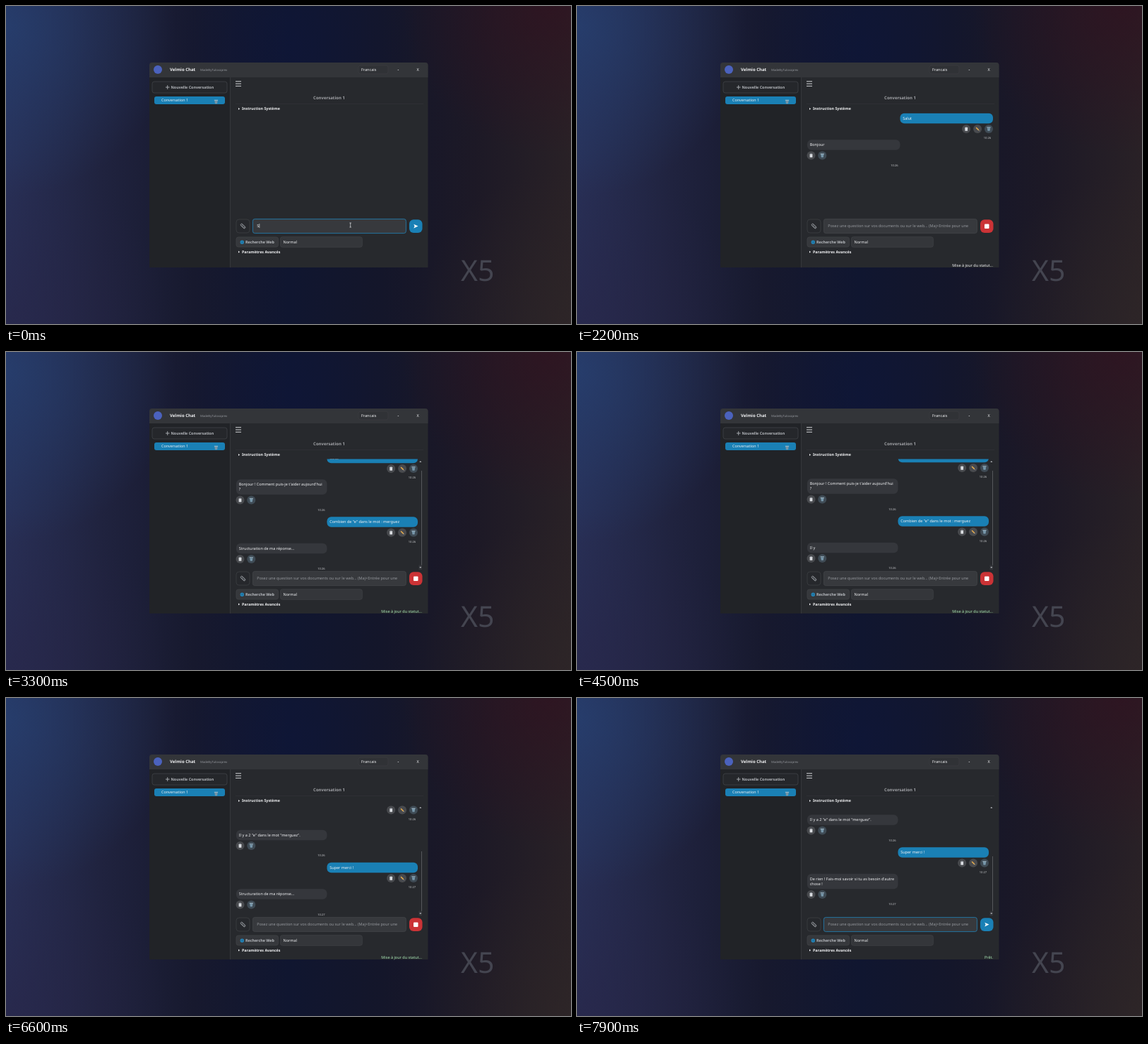
Animation of 800x450 px, one loop 8000 ms. Source, as an HTML page with a canvas:

```html
<!DOCTYPE html>
<html lang="fr">
<head>
<meta charset="utf-8">
<title>Chat</title>
<style>
html, body { margin: 0; width: 100%; height: 100%; overflow: hidden; background: #17192c; }
canvas { display: block; width: 800px; height: 450px; }
</style>
</head>
<body>
<canvas id="stage"></canvas>
<script>
const LOOP = 8000, STEP = 100;
const BLUE = '#1a80b5', WHITE = '#f0f1f3', GREEN = '#a8e5b4';
const canvas = document.getElementById('stage');
const ctx = canvas.getContext('2d');
const dpr = window.devicePixelRatio || 1;
canvas.width = 800 * dpr;
canvas.height = 450 * dpr;
ctx.scale(dpr, dpr);
ctx.textRendering = 'geometricPrecision';

// typeAt/typeRate and replyAt/replyRate: start in ms, characters per ms
const rounds = [
  { ask: 'Salut', typeAt: -100, typeRate: .01, sent: 600,
    reply: ["Bonjour ! Comment puis-je t'aider aujourd'hui", '?'],
    replyAt: 2150, replyRate: .14, done: 2500, clock: '10:26' },
  { ask: 'Combien de "e" dans le mot : merguez', typeAt: 2550, typeRate: .08, sent: 3100,
    reply: ['Il y a 2 "e" dans le mot "merguez".'],
    replyAt: 4467, replyRate: .12, done: 4800, clock: '10:26' },
  { ask: 'Super merci !', typeAt: 5150, typeRate: .02, sent: 6000,
    reply: ["De rien ! Fais-moi savoir si tu as besoin d'autre", 'chose !'],
    replyAt: 7267, replyRate: .12, done: 7800, clock: '10:27' }
];

// from ms, y of the first message, top of the scrollbar thumb
const scrollSteps = [
  [0, 159, 0], [3100, 150, 168], [4200, 149, 168], [4800, 142.5, 173],
  [6000, 66, 217], [7700, 58.5, 220], [7800, 44.5, 224]
];

function text(str, x, y, { size = 5.5, bold = false, color = WHITE, align = 'left' } = {}) {
  ctx.font = `${bold ? 'bold ' : ''}${size}px "Noto Sans", "Open Sans", sans-serif`;
  ctx.fillStyle = color;
  ctx.textAlign = align;
  ctx.textBaseline = 'alphabetic';
  ctx.fillText(str, x, y + size * .35);
}

function box(x, y, w, h, r, fill, stroke) {
  ctx.beginPath();
  ctx.roundRect(x, y, w, h, r);
  if (fill) { ctx.fillStyle = fill; ctx.fill(); }
  if (stroke) { ctx.strokeStyle = stroke; ctx.lineWidth = .8; ctx.stroke(); }
}

function disc(x, y, r, fill) {
  ctx.beginPath();
  ctx.arc(x, y, r, 0, 7);
  ctx.fillStyle = fill;
  ctx.fill();
}

function poly(points, fill) {
  ctx.beginPath();
  points.forEach(([x, y]) => ctx.lineTo(x, y));
  ctx.closePath();
  ctx.fillStyle = fill;
  ctx.fill();
}

function line(x1, y1, x2, y2, color, width = .8) {
  ctx.beginPath();
  ctx.moveTo(x1, y1);
  ctx.lineTo(x2, y2);
  ctx.strokeStyle = color;
  ctx.lineWidth = width;
  ctx.stroke();
}

function glow(x, y, r, rgb, alpha) {
  const g = ctx.createRadialGradient(x, y, 0, x, y, r);
  g.addColorStop(0, `rgba(${rgb},${alpha})`);
  g.addColorStop(1, `rgba(${rgb},0)`);
  ctx.fillStyle = g;
  ctx.fillRect(0, 0, 800, 450);
}

function background() {
  const g = ctx.createLinearGradient(0, 0, 800, 0);
  ['#283057', '#20233f', '#17192e', '#101630', '#14162a', '#1d1926', '#292126']
    .forEach((c, i) => g.addColorStop(i / 6, c));
  ctx.fillStyle = g;
  ctx.fillRect(0, 0, 800, 450);
  glow(0, 30, 240, '38,66,116', .7);
  glow(0, 450, 230, '40,36,70', .6);
  glow(770, 0, 210, '48,18,32', .75);
  glow(800, 450, 220, '48,40,40', .6);
  glow(400, 60, 190, '14,22,58', .6);
  text('X5', 644, 374.5, { size: 41, color: '#444550' });
}

const icons = {
  copy(x, y) {
    box(x - 1.9, y - 2.3, 3.8, 5, .5, '#d9dce0');
    box(x - 1, y - 2.9, 2, 1.2, .4, '#8d9299');
  },
  edit(x, y) {
    line(x - 2, y - 2, x + 1.6, y + 1.6, '#e5ac4d', 1.5);
    line(x + 1.6, y + 1.6, x + 2.5, y + 2.5, '#d8d0c0', .9);
  },
  trash(x, y) {
    line(x - 2.6, y - 2.2, x + 2.6, y - 2.2, '#a9c3d3', 1);
    poly([[x - 2.2, y - 1.4], [x + 2.2, y - 1.4], [x + 1.5, y + 2.8], [x - 1.5, y + 2.8]], '#7695a8');
  }
};

function iconButton(kind, x, y) {
  disc(x, y, 6, kind === 'trash' ? '#3f4b55' : '#484a4e');
  icons[kind](x, y);
}

function disclosure(label, y) {
  poly([[329, y - 1.5], [331, y], [329, y + 1.5]], WHITE);
  text(label, 334, y, { size: 5.35, bold: true });
}

function windowFrame() {
  box(203, 80, 394.5, 290, [4, 4, 0, 0], '#27292d');
  box(203, 101, 114, 269, 0, '#212327');
  box(203, 80, 394.5, 21, [4, 4, 0, 0], '#333539');
  line(317.5, 101, 317.5, 370, '#3a3c40');
  disc(215, 90, 6, '#4b62bd');
  text('Velmio Chat', 232, 90, { size: 6, bold: true });
  text('MadeByTulovaprex', 275, 90, { size: 4.3, color: '#92959b' });
  box(499, 84, 42, 12, 3, '#303236', '#3a3c40');
  text('Francais', 503, 90);
  text('-', 554.5, 90, { bold: true });
  text('X', 583, 90, { align: 'center' });

  box(207, 107, 106, 16, 3, '#25272b', '#414347');
  line(226, 115, 231.5, 115, '#a3a7ac', 1);
  line(228.7, 112.2, 228.7, 117.8, '#a3a7ac', 1);
  text('Nouvelle Conversation', 233.5, 115, { size: 5.35, bold: true, color: '#b4b7bc' });
  box(210, 128, 100, 11, 3, BLUE);
  text('Conversation 1', 220, 133.5, { size: 5.4 });
  icons.trash(297.5, 135.5);

  [106.7, 110, 113.3].forEach(y => line(325, y, 333, y, '#d0d2d5', 1));
  text('Conversation 1', 457.5, 130, { size: 6, bold: true, color: '#a0a2a6', align: 'center' });
  line(325, 138.5, 591, 138.5, '#303236');
  disclosure('Instruction Système', 145.5);
}

function userMessage(round, y, right) {
  const left = right === 589 ? 457.5 : 454.5;
  box(left, y - 7.2, right - left, 14.4, 6, BLUE);
  text(round.ask, left + 3.7, y);
  ['copy', 'edit', 'trash'].forEach((kind, i) => iconButton(kind, right - 37.8 + i * 15.9, y + 15));
  text(round.clock, right - 2.8, y + 28, { size: 4.1, color: '#c2c4c7', align: 'right' });
}

function botMessage(round, y, lines, right) {
  const extra = (lines.length - 1) * 7;
  const edge = right === 589 ? 457.5 : 454.5;
  box(326, y - 7.2, edge - 326, 14.4 + extra, 6, '#35373c');
  lines.forEach((str, i) => text(str, 329.7, y + i * 7));
  iconButton('copy', 331.5, y + 15 + extra);
  iconButton('trash', 347.3, y + 15 + extra);
  text(round.clock, edge - 2.8, y + 29 + extra, { size: 4.1, color: '#c2c4c7', align: 'right' });
}

function replyLines(round, t) {
  const count = Math.round((t - round.replyAt) * round.replyRate);
  if (count <= 0) return ['Structuration de ma réponse...'];
  const [first, second] = round.reply;
  if (!second || count <= first.length) return [first.slice(0, count)];
  return [first, second.slice(0, count - first.length)];
}

function messages(t, shift) {
  const [, start, thumb] = scrollSteps.filter(s => s[0] <= t).pop();
  const right = thumb ? 583 : 589;
  ctx.save();
  ctx.beginPath();
  ctx.rect(318, 151.5, 279, 147.5 + shift);
  ctx.clip();
  let y = start;
  rounds.forEach((round, i) => {
    if (t < round.sent) return;
    // the second question sits higher once the third is asked
    const lift = i === 1 && t >= rounds[2].sent ? 13 : 0;
    userMessage(round, y - lift, right);
    y += 37.5;
    const lines = replyLines(round, t);
    botMessage(round, y, lines, right);
    y += 46 + (lines.length - 1) * 7;
  });
  ctx.restore();
  if (thumb) {
    line(588.5, thumb, 588.5, 308, '#55585c', 1);
    box(584.5, 301.5, 4.5, 6.5, 0, '#34363a');
    poly([[585.3, 156], [588.3, 156], [586.8, 154]], '#b0b3b7');
    poly([[585.3, 304], [588.3, 304], [586.8, 306]], '#b0b3b7');
  }
}

function composer(t, busy, typed, focused) {
  box(326, 302, 19, 19, 4, '#26282c', '#3d3f43');
  ctx.save();
  ctx.translate(335.5, 311.5);
  ctx.rotate(-Math.PI / 4);
  box(-1.5, -4, 3, 8, 1.5, null, '#a9adb2');
  box(-.5, -2, 1.7, 5, .8, null, '#8b9096');
  ctx.restore();

  box(349.4, 301.4, 217, 20.2, 3, '#37393d', focused ? '#2385b9' : '#43464a');
  if (typed) {
    text(typed, 355.3, 311);
    const end = 355.8 + ctx.measureText(typed).width;
    line(end, 308, end, 314, WHITE, .6);
  } else {
    text('Posez une question sur vos documents ou sur le web... (Maj+Entrée pour une',
      355.3, 311, { color: '#94979c' });
  }

  box(571, 302.3, 18.5, 18.7, 6, busy ? '#cb3336' : BLUE);
  if (busy) box(577, 308.4, 6.5, 6.5, 1, '#fff');
  else poly([[577.3, 308.8], [583.5, 311.6], [577.3, 314.4], [578.6, 311.6]], '#fff');

  box(326, 327, 59.5, 14, 3, '#36383c', '#404246');
  disc(334.3, 334.2, 2.7, '#2589bd');
  line(331.8, 334.2, 336.8, 334.2, '#175d84', .5);
  line(334.3, 331.7, 334.3, 336.7, '#175d84', .5);
  text('Recherche Web', 339, 334, { size: 5.35, bold: true, color: '#b9bcc1' });
  box(388.4, 326.7, 116, 14.6, 3, '#34363a', '#3e4044');
  text('Normal', 392.5, 334);
  disclosure('Paramètres Avancés', 348);
}

function pointer(x, y) {
  line(x, y - 3, x, y + 3, '#dfe1e4', .7);
  [-3, 3].forEach(d => line(x - 1.3, y + d, x + 1.3, y + d, '#dfe1e4', .7));
}

function draw(t) {
  ctx.clearRect(0, 0, 800, 450);
  background();
  windowFrame();

  const busy = rounds.some(r => t >= r.sent && t < r.done);
  const writing = rounds.find(r => t >= r.typeAt && t < r.sent);
  const typed = writing
    ? writing.ask.slice(0, Math.round((t - writing.typeAt) * writing.typeRate)) : '';
  const settled = t >= rounds[0].done;
  const shift = settled ? 9 : 0;

  messages(t, shift);
  ctx.save();
  ctx.translate(0, shift);
  composer(t, busy, typed, !busy);
  ctx.restore();

  if (t >= rounds[0].sent) {
    text(busy ? 'Mise à jour du statut...' : 'Prêt.', 589, 367,
      { color: settled ? GREEN : WHITE, align: 'right' });
  }
  if (t < 600) pointer(487.7, 310);
  if (t >= 5100 && t < 6000) pointer(504, 325);
}

const origin = performance.now();
function tick() {
  const t = (performance.now() - origin) % LOOP;
  draw(Math.floor(t / STEP) * STEP);
  requestAnimationFrame(tick);
}
tick();
</script>
</body>
</html>
```
